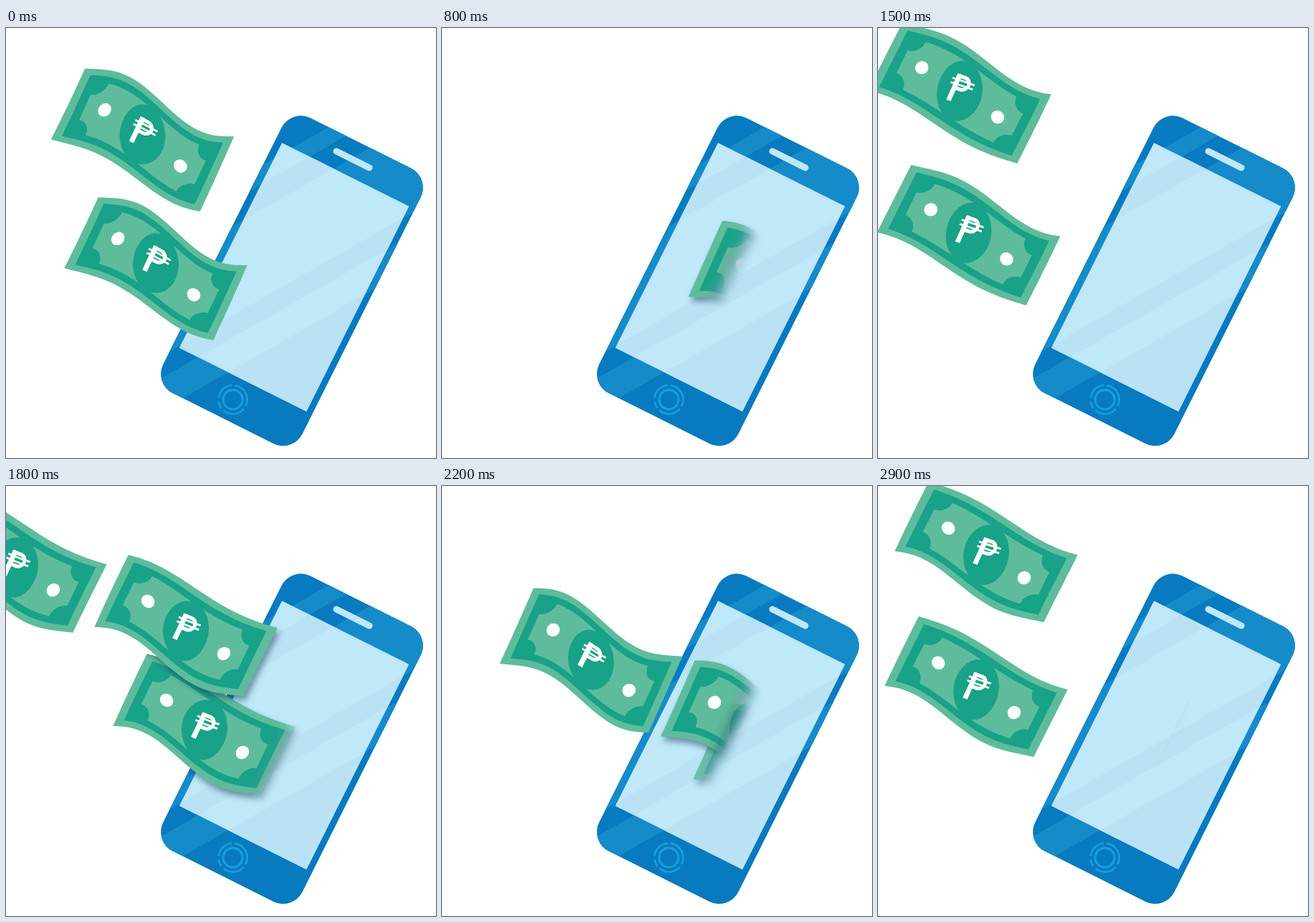
Animation, 600 px wide and 600 px high, one loop 3 s. Source, as an HTML page with a canvas:

```html
<!DOCTYPE html>
<html lang="en">
<head>
<meta charset="utf-8">
<title>Money to phone</title>
<style>
  html, body { margin: 0; width: 100%; height: 100%; overflow: hidden; background: #fff; }
  canvas { display: block; width: 600px; height: 600px; }
</style>
</head>
<body>
<canvas id="stage" width="600" height="600"></canvas>
<script>
const LOOP = 3000, STEP = 100, SIZE = 600;
const LIGHT = '#5ebc9d', DARK = '#18a287';
const BODY = '#087ac0', BODY_GLOSS = '#168bca', SCREEN = '#bfe8f9', SCREEN_SHADE = '#b9e3f5';
const TILT = 25.3 * Math.PI / 180;
const COS = Math.cos(TILT), SIN = Math.sin(TILT);
const BEND = 10.8, BEND_SPAN = 104;

const stage = document.getElementById('stage').getContext('2d');

function makeLayer() {
  const canvas = document.createElement('canvas');
  canvas.width = canvas.height = SIZE;
  return canvas.getContext('2d');
}
const phone = makeLayer();
const note = makeLayer();

// Each route lists [time, x, y] of the note's centre; lower lanes come first.
const routes = [
  [[2600, 13, 197.2], [2900, 137, 282], [3000, 209, 332], [3400, 360, 375.3]],
  [[2600, 83, -4.8], [2900, 151, 94.1], [3000, 190.5, 152.4], [3400, 331, 262.3]],
  [[1200, -24, 238.5], [1800, 277, 336.4], [2200, 478, 404]],
  [[1200, -23, -19.5], [1800, 251, 198.4], [2200, 433, 344]],
  [[1800, 13, 109.7], [2200, 208, 242.9], [2600, 420, 354], [2900, 513, 400]]
];

function along(route, time) {
  let i = 0;
  while (i < route.length - 2 && time > route[i + 1][0]) i++;
  const [t0, x0, y0] = route[i], [t1, x1, y1] = route[i + 1];
  const k = (time - t0) / (t1 - t0);
  return { x: x0 + (x1 - x0) * k, y: y0 + (y1 - y0) * k };
}

// Maps note coordinates to the stage: tilt, fixed S-bend, travelling ripple.
function makeWarp(centre, phase) {
  return ([a, b]) => {
    const x = a * COS - b * SIN;
    const bend = BEND * Math.sin(Math.PI * a * COS / BEND_SPAN);
    const ripple = 4.2 * Math.sin(Math.PI * x / 90 + phase);
    return [centre.x + x, centre.y + a * SIN + b * COS + bend + ripple];
  };
}

const tilt = ([a, b]) => [a * COS - b * SIN, a * SIN + b * COS];

// Places a stage offset near the note's centre so that the S-bend does not shear it.
function unbend([x, y]) {
  const slope = BEND * Math.PI / BEND_SPAN * COS;
  const flat = (y - slope * COS * x) / (1 + slope * SIN);
  return [x * COS + flat * SIN, flat * COS - x * SIN];
}

function arc(cx, cy, r, from = 0, to = Math.PI * 2, ry = r) {
  const n = 28;
  return Array.from({ length: n + 1 }, (_, i) => {
    const angle = from + (to - from) * i / n;
    return [cx + r * Math.cos(angle), cy + ry * Math.sin(angle)];
  });
}

function subdivide(points) {
  const out = [];
  points.forEach((p, i) => {
    const q = points[(i + 1) % points.length];
    const n = Math.max(1, Math.ceil(Math.hypot(q[0] - p[0], q[1] - p[1]) / 6));
    for (let j = 0; j < n; j++) {
      out.push([p[0] + (q[0] - p[0]) * j / n, p[1] + (q[1] - p[1]) * j / n]);
    }
  });
  return out;
}

const box = (a0, b0, a1, b1) => [[a0, b0], [a1, b0], [a1, b1], [a0, b1]];

function scalloped(w, h, r) {
  const q = Math.PI / 2;
  return [
    ...arc(-w, -h, r, q, 0),
    ...arc(w, -h, r, 2 * q, q),
    ...arc(w, h, r, 3 * q, 2 * q),
    ...arc(-w, h, r, 4 * q, 3 * q)
  ];
}

const bowl = [
  [-13, -21.5], ...arc(0, -10.5, 11, -Math.PI / 2, Math.PI / 2), [-6.5, 0.5],
  [-6.5, -4.5], ...arc(0, -10.5, 6, Math.PI / 2, -Math.PI / 2), [-13, -16.5]
];
const glyph = [
  box(-13, -21.5, -6, 16.5),
  bowl,
  box(-17.5, -15.1, 16.5, -12.4),
  box(-17.5, -8.9, 16.5, -6.2)
];

const noteParts = [
  [LIGHT, box(-115, -55.5, 115, 55.5)],
  [DARK, box(-102.5, -46.5, 102.5, 46.5)],
  [LIGHT, scalloped(89, 37.5, 19)],
  [DARK, arc(0, 0, 32, 0, Math.PI * 2, 42).map(unbend)],
  ['#fff', arc(-59.6, -2.2, 9.2)],
  ['#fff', arc(59.6, 2.2, 9.2)],
  ...glyph.map(shape => ['#fff', shape.map(tilt).map(unbend)])
].map(([color, points]) => [color, subdivide(points)]);

function fillPath(ctx, points, color) {
  ctx.beginPath();
  points.forEach(([x, y]) => ctx.lineTo(x, y));
  ctx.closePath();
  ctx.fillStyle = color;
  ctx.fill();
}

// Notes dissolve along a line parallel to the phone's long side.
const fade = note.createLinearGradient(546 / 1.25, 546 / 2.5, 587 / 1.25, 587 / 2.5);
[[0, 1], [0.25, 0.88], [0.5, 0.55], [0.75, 0.18], [1, 0]]
  .forEach(([at, alpha]) => fade.addColorStop(at, `rgba(0,0,0,${alpha})`));

function drawNote(centre, phase) {
  const warp = makeWarp(centre, phase);
  note.globalCompositeOperation = 'source-over';
  note.clearRect(0, 0, SIZE, SIZE);
  noteParts.forEach(([color, points]) => fillPath(note, points.map(warp), color));
  note.globalCompositeOperation = 'destination-in';
  note.fillStyle = fade;
  note.fillRect(0, 0, SIZE, SIZE);

  // The shadow only lands on what is already painted.
  const depth = Math.min(1, Math.max(0, (centre.x - 209) / 42));
  if (depth > 0) {
    stage.save();
    stage.globalCompositeOperation = 'source-atop';
    stage.shadowColor = `rgba(15,45,70,${0.48 * depth})`;
    stage.shadowBlur = 8;
    stage.shadowOffsetX = 2003;
    stage.shadowOffsetY = 6;
    stage.drawImage(note.canvas, -2000, 0);
    stage.restore();
  }
  stage.drawImage(note.canvas, 0, 0);
}

function glossBand(ctx, from, to, color) {
  const y = (m, x) => m - 0.57 * x;
  fillPath(ctx, [[0, y(from, 0)], [SIZE, y(from, SIZE)], [SIZE, y(to, SIZE)], [0, y(to, 0)]], color);
}

function paintPhone(ctx) {
  const place = () => {
    ctx.translate(399, 352.7);
    ctx.rotate(Math.atan(0.5));
  };
  const inside = (trace, color, bands, bandColor) => {
    ctx.save();
    ctx.save();
    place();
    ctx.beginPath();
    trace();
    ctx.restore();
    ctx.fillStyle = color;
    ctx.fill();
    ctx.clip();
    bands.forEach(([from, to]) => glossBand(ctx, from, to, bandColor));
    ctx.restore();
  };
  inside(() => ctx.roundRect(-108.6, -214.7, 217.2, 429.4, 30),
    BODY, [[395, 421], [457, 581], [612, 657]], BODY_GLOSS);
  inside(() => ctx.rect(-98.6, -166, 198.2, 320),
    SCREEN, [[421, 457], [581, 612], [657, 1100]], SCREEN_SHADE);

  ctx.lineCap = 'round';
  ctx.strokeStyle = SCREEN;
  ctx.lineWidth = 9;
  ctx.beginPath();
  ctx.moveTo(461, 172);
  ctx.lineTo(507, 195);
  ctx.stroke();

  ctx.lineCap = 'butt';
  ctx.strokeStyle = '#18a0dd';
  const ring = (r, width, from, to) => {
    ctx.lineWidth = width;
    ctx.beginPath();
    ctx.arc(316.5, 518.5, r, from, to);
    ctx.stroke();
  };
  ring(13.5, 3, 0, Math.PI * 2);
  ring(20, 2.6, -1.45, 0.5);
  ring(20, 2.6, 0.7, 2.3);
  ring(20, 2.6, 2.5, 3.0);
  ring(20, 2.6, 3.25, 4.65);
}

function draw(time) {
  const phase = -(75 + 0.295 * time) * Math.PI / 180;
  stage.clearRect(0, 0, SIZE, SIZE);
  stage.drawImage(phone.canvas, 0, 0);
  for (const route of routes) {
    for (const t of [time, time + LOOP]) {
      const centre = along(route, t);
      const onStage = centre.x > -140 && centre.y > -130 && centre.x + centre.y / 2 < 725;
      if (onStage) drawNote(centre, phase);
    }
  }
}

paintPhone(phone);
const start = performance.now();
function tick() {
  const elapsed = (performance.now() - start) % LOOP;
  draw(Math.floor(elapsed / STEP) * STEP);
  requestAnimationFrame(tick);
}
tick();
</script>
</body>
</html>
```
